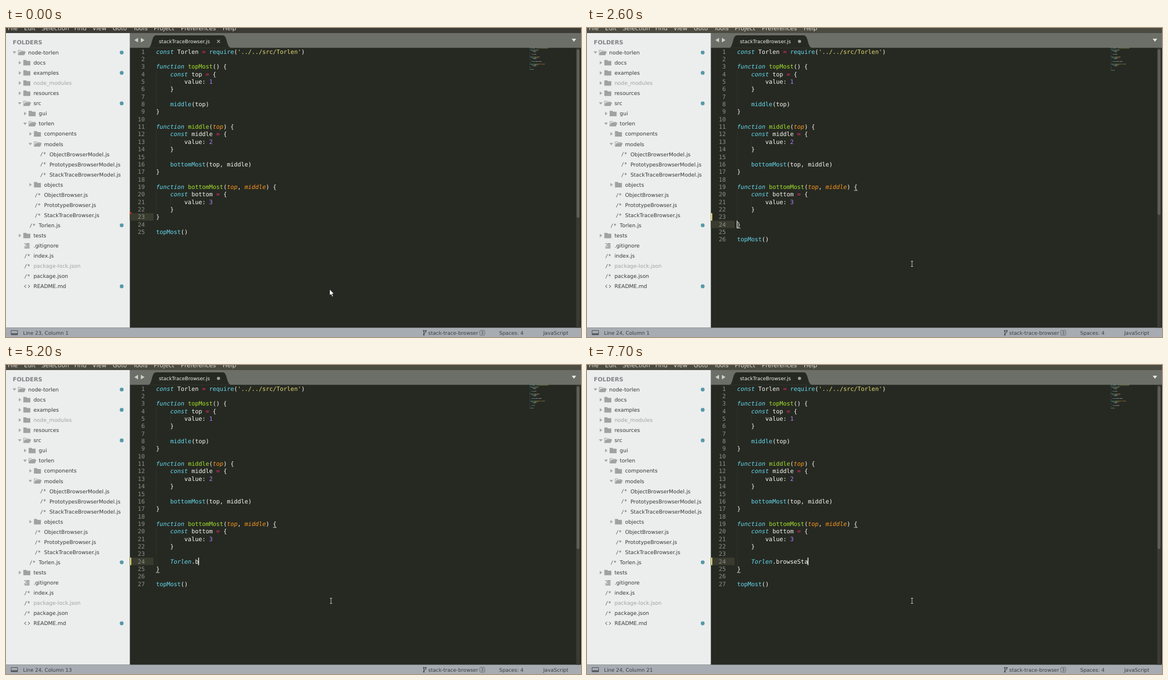
An HTML page for the animation above (8 s loop, 1019 by 549 pixels).

```html
<!DOCTYPE html>
<html lang="en">
<head>
<meta charset="utf-8">
<title>Code editor</title>
<style>
  html, body { margin: 0; height: 100%; overflow: hidden; background: #262922; }
  svg { display: block; width: 100vw; height: 100vh; }
  text { white-space: pre; text-rendering: geometricPrecision; font: 9.32px "DejaVu Sans", sans-serif; }
  .code { font: 10.43px "DejaVu Sans Mono", monospace; fill: #f8f8f2; }
  .menu { font-size: 10.55px; fill: #dfdbd2; }
  .status { font-size: 8.9px; fill: #3b3f43; }
  .bold { font-weight: bold; }
  .italic { font-style: italic; }
</style>
</head>
<body>
<svg viewBox="0 0 1019 549" preserveAspectRatio="none">
  <g id="chrome"></g>
  <g id="live"></g>
</svg>
<script>
const LOOP = 8000, LEFT = 265.9, TOP = 35.2, CHAR = 6.28, ROW = 13.35;
const SIDE = 219.5, BAR = 9, TABS = 35.2, FOOT = 532.5;
const MINI = 0.785;
const WHITE = '#f8f8f2', BLUE = '#66d9ef', EDITOR = '#262922';

const rect = (x, y, w, h, fill, more = '') =>
  `<rect x="${x}" y="${y}" width="${w}" height="${h}" fill="${fill}" ${more}/>`;
const path = (d, fill, more = '') => `<path d="${d}" fill="${fill}" ${more}/>`;
const dot = (x, y, r, fill) => `<circle cx="${x}" cy="${y}" r="${r}" fill="${fill}"/>`;
const text = (x, y, s, more = '') => `<text x="${x}" y="${y}" ${more}>${s}</text>`;
const stroke = (color, w = 1) => `stroke="${color}" stroke-width="${w}"`;
const colX = col => LEFT + col * CHAR;
const rowY = line => TOP + (line - 1) * ROW;

// ---- sidebar, tab bar and status bar ----

// depth, kind (+ open folder, - closed folder, / script, = list, < markup), name, flags (* dot, ~ dimmed)
const tree = `0+node-torlen*
1-docs
1-examples*
1-node_modules~
1-resources
1+src*
2-gui
2+torlen
3-components
3+models
4/ObjectBrowserModel.js
4/PrototypesBrowserModel.js
4/StackTraceBrowserModel.js
3-objects
3/ObjectBrowser.js
3/PrototypeBrowser.js
3/StackTraceBrowser.js
2/Torlen.js*
1-tests
1=.gitignore
1/index.js
1/package-lock.json~
1/package.json
1<README.md*`.split('\n');

const FOLDER = '#a0a2a2', FILE = '#4f5253';

const icons = {
  '-': (x, y) => path(`M${x - 26} ${y - 3.2}l4.2 3.2l-4.2 3.2z`, '#a4a7a7') +
    path(`M${x - 18} ${y - 4.8}h5l1.4 1.6h6v8h-12.4z`, FOLDER),
  '+': (x, y) => path(`M${x - 27.6} ${y - 2}h6.4l-3.2 4.2z`, '#a4a7a7') +
    path(`M${x - 17.5} ${y + 4}v-8h4l1.2 1.5h5.5v2`, 'none', stroke(FOLDER)) +
    path(`M${x - 18} ${y + 4.7}l2.6 -6.4h11.2l-2.6 6.4z`, FOLDER),
  '/': (x, y) => text(x - 16.5, y + 3.2, '/*', `fill="${FILE}" style="font:8.8px 'DejaVu Sans Mono',monospace"`),
  '=': (x, y) => path(`M${x - 16} ${y - 3.5}h2m1 0h6M${x - 14} ${y - 1}h7M${x - 16} ${y + 1.5}h2m1 0h6M${x - 16} ${y + 4}h9`,
    'none', stroke(FILE)),
  '<': (x, y) => path(`M${x - 13} ${y - 2.6}l-3 2.6l3 2.6m3.4 -5.2l3 2.6l-3 2.6`, 'none', stroke(FILE))
};

function treeRow(entry, i) {
  const [, depth, kind, name, flag] = entry.match(/^(\d)(.)(.*?)([*~]?)$/);
  const x = 39.3 + 9.4 * depth, y = 43.6 + 18.06 * i;
  return icons[kind](x, y) +
    text(x, y + 3.4, name, `fill="${flag === '~' ? '#a0a3a4' : '#383b3c'}"`) +
    (flag === '*' ? dot(205, y, 3.4, '#5799a7') : '');
}

document.getElementById('chrome').innerHTML =
  rect(SIDE, BAR, 1019 - SIDE, TABS - BAR, '#6c6f68') +
  path(`M252 ${TABS}C260 ${TABS - 1} 257 13 266 13H384C393 13 390 ${TABS - 1} 399 ${TABS}z`, EDITOR) +
  path('M234 17.5v8l-6.5 -4zM239 17.5v8l6.5 -4z', '#cdcfca') +
  path('M1002.5 19h8l-4 5.5z', '#e6e7e3') +
  text(271, 27, 'stackTraceBrowser.js', 'fill="#eeefea" style="font-size:8.7px"') +
  rect(0, BAR, SIDE, FOOT - BAR, '#ebeeed') +
  text(12, 29.3, 'FOLDERS', 'class="bold" fill="#7f8384" style="font-size:10.1px"') +
  tree.map(treeRow).join('') +
  rect(0, FOOT, 1019, 549 - FOOT, '#a6acb2') +
  path('M9 537.5h11.5v7.5H9z', 'none', stroke('#50555a')) + rect(9, 542.5, 11.5, 2.5, '#50555a') +
  path('M740.5 538v7M744 538.5v1.5q0 2 -3.5 2.5', 'none', stroke('#3b3f43')) +
  [[740.5, 538], [740.5, 545], [744, 538]].map(([x, y]) => dot(x, y, 1.3, '#3b3f43')).join('') +
  text(748.3, 544.5, 'stack-trace-browser', 'class="status"') +
  rect(839.7, 537.2, 8.6, 8.6, 'none', 'rx="1.5" stroke="#5b6065" stroke-width=".8"') +
  text(841.8, 544.2, '3', 'class="status" style="font-size:7px"') +
  text(874, 544.5, 'Spaces: 4', 'class="status"') +
  text(952, 544.5, 'JavaScript', 'class="status"');

// ---- code ----

const block = (head, name, value, next) => [
  head + ' {', `    const ${name} = {`, `        value: ${value}`, '    }', ...next, '}', ''];
const base = [
  "const Torlen = require('../../src/Torlen')", '',
  ...block('function topMost()', 'top', 1, ['', '    middle(top)']),
  ...block('function middle(top)', 'middle', 2, ['', '    bottomMost(top, middle)']),
  ...block('function bottomMost(top, middle)', 'bottom', 3, []),
  'topMost()'
];

// Splits a line into [text, column, colour, italic]
function tokens(line) {
  return [...line.matchAll(/'[^']*'|\w+|=|[^\w'=]+/g)].map(m => {
    const s = m[0], at = m.index, next = line[at + s.length];
    const style =
      /^(const|function)$/.test(s) ? [BLUE, 1] :
      s[0] === "'" ? ['#e6db74'] :
      /^\d/.test(s) ? ['#ae81ff'] :
      s === '=' ? ['#f92672'] :
      !/\w/.test(s) ? [WHITE] :
      line.startsWith('function') ? (at === 9 ? ['#a6e22e'] : ['#fd971f', 1]) :
      next === '(' ? [BLUE] :
      next === '.' ? [BLUE, 1] : [WHITE];
    return [s, at, ...style];
  });
}

function codeLine(line, i) {
  const y = TOP + i * ROW + 10.4, parts = tokens(line);
  const spans = parts.map(([s, , fill, italic]) =>
    `<tspan fill="${fill}"${italic ? ' class="italic"' : ''}>${s}</tspan>`).join('');
  const mini = parts.filter(p => p[0].trim()).map(([s, at, fill]) =>
    rect(928 + at * MINI, 35.4 + i * 2 * MINI, s.trim().length * MINI, 0.9, fill, 'opacity=".5"')).join('');
  return text(246, y, i + 1, 'class="code" text-anchor="end" style="fill:#8f908a"') +
    text(LEFT, y, spans, 'class="code"') + mini;
}

// Dotted indent guides; blank lines inside a block take the outer one
function guides(lines) {
  let inside = false, d = '';
  lines.forEach((line, i) => {
    if (line[0] === '}') inside = false;
    if (inside) {
      const depth = Math.max(1, line.search(/\S|$/) / 4);
      for (let k = 0; k < depth; k++) d += `M${colX(4 * k) + 0.4} ${TOP + i * ROW}v${ROW}`;
    }
    if (line.startsWith('function')) inside = true;
  });
  return path(d, 'none', stroke('#41423b', 0.8) + ' stroke-dasharray="1 .8"');
}

// ---- timeline: each step changes part of the state ----

const say = s => ({ typed: '    ' + s, caret: 1, popup: [] });
const steps = [
  [0, { mouse: [573.4, 464], line: 23, col: 1, added: 0, typed: '', caret: 0, popup: [] }],
  [100, { mouse: [575.5, 451.5] }],
  [400, { mouse: [576, 440] }],
  [500, { mouse: [576, 426] }],
  [600, { mouse: [576, 419], beam: true }],
  [700, { focus: true, line: 25, col: 10, caret: 1 }],
  [1100, { caret: 0.75 }],
  [1200, { caret: 0.4 }],
  [1300, { caret: 0.12 }],
  [1500, { caret: 0 }],
  [1700, { line: 23, col: 2, caret: 1 }],
  [2000, { caret: 0.85 }],
  [2300, { col: 1, caret: 1 }],
  [2400, { line: 24, added: 1 }],
  [2600, { caret: 0.9 }],
  [3000, { added: 2, caret: 1 }],
  [3200, say('')],
  [3600, say('T')],
  [3700, { popup: ['Torlen'], match: 1 }],
  [3900, { ...say('To'), popup: ['Torlen'], match: 2 }],
  [4000, { ...say('Tor'), popup: ['Torlen'], match: 3 }],
  [4100, { ...say('Torl'), popup: ['Torlen'], match: 4 }],
  [4400, { ...say('Torle'), popup: ['Torlen'], match: 5 }],
  [4500, say('Torlen')],
  [4700, { caret: 0.85 }],
  [4900, say('Torlen.')],
  [5200, say('Torlen.b')],
  [5300, { popup: ['bottom', 'bottomMost'], match: 1 }],
  [5600, { caret: 0.7 }],
  [5700, { caret: 0.3 }],
  [5800, { caret: 0 }],
  [6000, say('Torlen.br')],
  [6100, say('Torlen.bro')],
  [6300, say('Torlen.brow')],
  [6600, { caret: 0.85 }],
  [7000, say('Torlen.brows')],
  [7100, say('Torlen.browse')],
  [7400, say('Torlen.browseSt')],
  [7700, say('Torlen.browseSta')]
];

function popup({ popup: words, match, typed }) {
  const x = colX(typed.length - match), h = 16.2;
  return words.map((word, i) => {
    const y = 356 + i * h;
    return rect(x - 5, y, 235, h, i ? '#33342f' : '#5b5c56') +
      text(x, y + 11, `<tspan class="bold">${word.slice(0, match)}</tspan>${word.slice(match)}`, 'class="code"');
  }).join('');
}

function pointer({ mouse: [x, y], beam }) {
  return beam
    ? path(`M${x - 2} ${y - 4.6}h4M${x} ${y - 4.6}v9.2M${x - 2} ${y + 4.6}h4`, 'none', stroke('#e8e8e4', 0.8))
    : path(`M${x} ${y}v11.5l2.7 -2.4l1.9 4.4l2 -.9l-1.9 -4.2h3.5z`, '#fff', stroke('#111', 0.8));
}

function brackets({ focus, line, added }) {
  if (!focus) return '';
  const marks = line === 25 ? [[25, 7, 2]] : [[19, 33, 1], [23 + added, 0, 1]];
  return marks.map(([row, col, n]) => rect(colX(col), rowY(row) + 12.8, n * CHAR, 0.9, '#d5d5cf')).join('');
}

const menus = { File: 3, Edit: 32, Selection: 63, Find: 121, View: 153, Goto: 189,
  Tools: 225, Project: 262, Preferences: 310, Help: 384 };

function draw(s) {
  const lines = [...base];
  if (s.added) lines.splice(22, 0, ...['', s.typed].slice(0, s.added));
  const col = s.typed ? s.typed.length + 1 : s.col;
  const mark = s.added
    ? rect(SIDE + 0.3, rowY(22 + s.added), 2.2, ROW, '#e6db74')
    : path('M219.5 326l3.2 2.8l-3.2 2.8z', '#f0321e');
  const tabEnd = s.added
    ? dot(376.6, 23.8, 2.8, '#a0a19b')
    : path('M374 21.2l5.2 5.2m0 -5.2l-5.2 5.2', 'none', stroke('#b5b6b0', 1.2));

  return rect(0, 0, 1019, BAR, s.focus ? '#4c4b42' : '#3c3b36') +
    Object.entries(menus).map(([name, x]) => text(x, 4, name, 'class="menu"')).join('') +
    tabEnd +
    rect(SIDE, rowY(s.line), 42, ROW, '#3a3b2f') + mark +
    guides(lines) +
    lines.map(codeLine).join('') +
    brackets(s) +
    rect(colX(col - 1) - 0.6, rowY(s.line), 1.4, ROW, WHITE, `opacity="${s.caret}"`) +
    rect(1010.5, TABS, 6.5, FOOT - TABS, '#3a3b34') +
    rect(1011.3, 38, 5, 299 - 5 * s.added, '#5e5f58', 'rx="2.5"') +
    popup(s) +
    text(30.2, 544.5, `Line ${s.line}, Column ${col}`, 'class="status"') +
    pointer(s);
}

const live = document.getElementById('live');
let shown = -1;

function tick() {
  const now = performance.now() % LOOP;
  const past = steps.filter(([at]) => at <= now);
  if (past.length !== shown) {
    shown = past.length;
    live.innerHTML = draw(Object.assign({}, ...past.map(([, change]) => change)));
  }
  requestAnimationFrame(tick);
}
tick();
</script>
</body>
</html>
```
